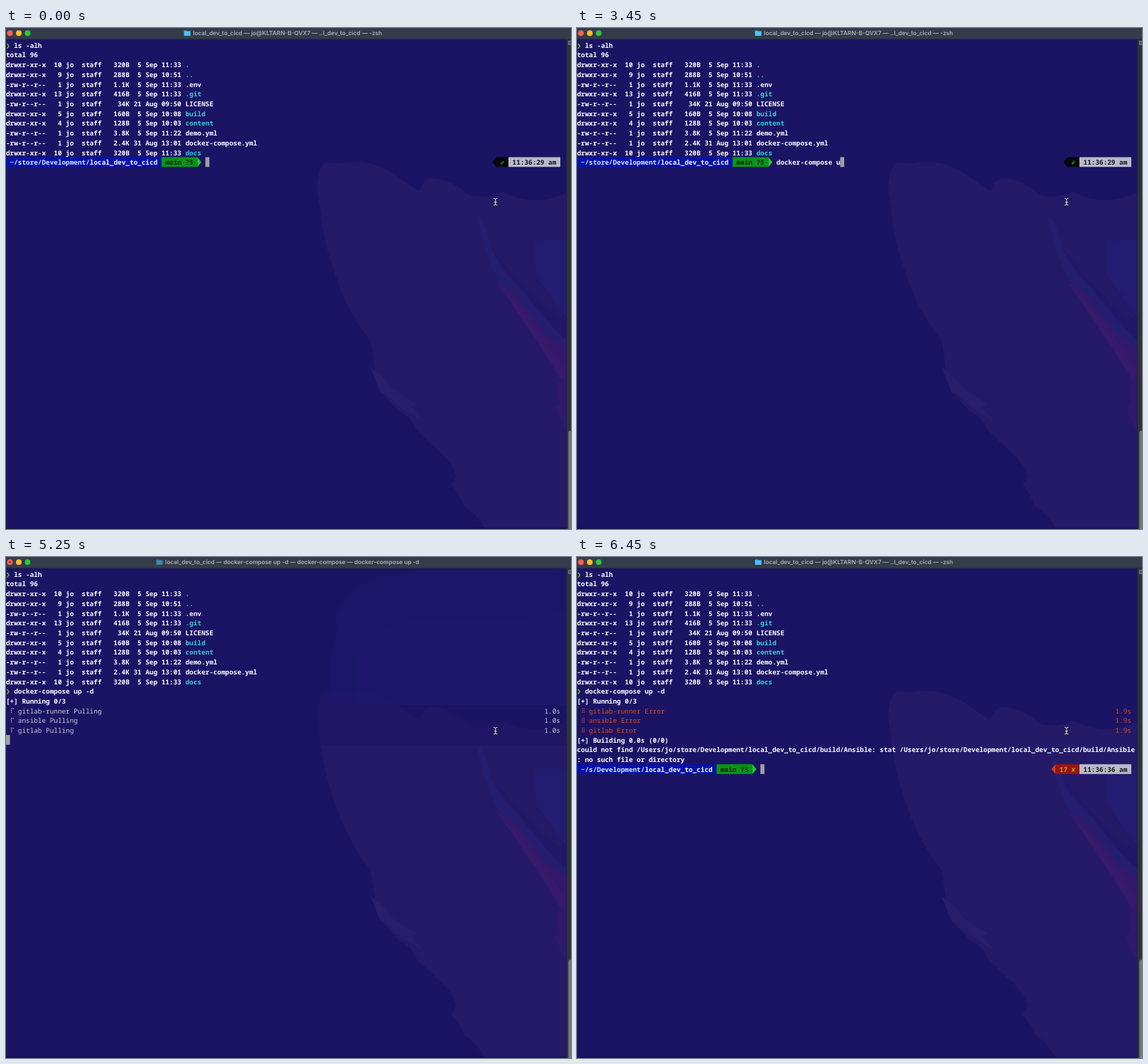
Animation, 795 px wide and 704 px high, one loop 8000 ms. Source, as an HTML page with a canvas:

```html
<!DOCTYPE html>
<html lang="en">
<head>
<meta charset="utf-8">
<title>Terminal session</title>
<style>
  html, body { margin: 0; width: 100%; height: 100%; overflow: hidden; background: #1b1464; }
  canvas { display: block; }
</style>
</head>
<body>
<canvas id="stage" width="795" height="704"></canvas>
<script>
const ctx = document.getElementById('stage').getContext('2d');
const LOOP = 8000, STEP = 150;
const CELL = 5.611, LINE = 13.71, TOP = 17;
const MONO = '9.35px "Noto Sans Mono", "DejaVu Sans Mono", monospace';
const WHITE = '#fbfbff', CYAN = '#35cdd6', GREY = '#cbc9cf', RED = '#dc4a24', CURSOR = '#a09fa8';
const COMMAND = 'docker-compose up -d';
const SPINNER = '⠋⠙⠹⠸⠼⠴⠦⠧⠇⠏';
const SERVICES = ['gitlab-runner', 'ansible', 'gitlab'];
const FILES = [
  ['drwxr-xr-x', 10, '320B', ' 5 Sep 11:33', '.'],
  ['drwxr-xr-x', 9, '288B', ' 5 Sep 10:51', '..'],
  ['-rw-r--r--', 1, '1.1K', ' 5 Sep 11:33', '.env'],
  ['drwxr-xr-x', 13, '416B', ' 5 Sep 11:33', '.git'],
  ['-rw-r--r--', 1, '34K', '21 Aug 09:50', 'LICENSE'],
  ['drwxr-xr-x', 5, '160B', ' 5 Sep 10:08', 'build'],
  ['drwxr-xr-x', 4, '128B', ' 5 Sep 10:03', 'content'],
  ['-rw-r--r--', 1, '3.8K', ' 5 Sep 11:22', 'demo.yml'],
  ['-rw-r--r--', 1, '2.4K', '31 Aug 13:01', 'docker-compose.yml'],
  ['drwxr-xr-x', 10, '320B', ' 5 Sep 11:33', 'docs']
];
const rowTop = row => TOP + row * LINE;

function rect(x, y, w, h, color) {
  ctx.fillStyle = color;
  ctx.fillRect(x, y, w, h);
}

function shape(points, color) {
  ctx.fillStyle = color;
  ctx.fill(new Path2D('M' + points + 'Z'));
}

function disc(x, y, r, color) {
  ctx.fillStyle = color;
  ctx.beginPath();
  ctx.arc(x, y, r, 0, 7);
  ctx.fill();
}

function text(col, row, str, color = WHITE, weight = 600) {
  ctx.font = weight + ' ' + MONO;
  ctx.fillStyle = color;
  ctx.fillText(str, col * CELL, rowTop(row) + 10.7);
}

function cells(from, to, row, color) {
  rect(from * CELL, rowTop(row), (to - from) * CELL, LINE, color);
}

// Powerline arrow one cell wide; dir 1 points right, -1 left
function arrow(col, row, dir, color) {
  const x = col * CELL, y = rowTop(row);
  shape(`${x} ${y}L${x + dir * CELL} ${y + LINE / 2}L${x} ${y + LINE}`, color);
}

function braille(row, char, color) {
  const bits = char.codePointAt(0) & 63;
  for (let i = 0; i < 6; i++) {
    if (bits >> i & 1) rect(i < 3 ? 7 : 9.4, rowTop(row) + 3.6 + i % 3 * 2.5, 1.3, 1.3, color);
  }
}

function wallpaper() {
  rect(0, 0, 795, 704, '#1b1464');
  shape('438 225Q439 196 450 189L472 190Q505 184 530 197C552 206 564 220 582 229Q587 212 600 211' +
    'Q625 212 652 235Q676 240 699 230Q738 253 788 232V704H674Q662 682 645 672Q634 648 627 643' +
    'L634 630Q627 608 604 590L578 565Q570 546 552 538L530 514L527 492L512 478L519 480' +
    'Q516 455 513 440Q490 410 478 384Q452 325 444 272Q441 245 438 225', '#251a68');
  shape('663 266Q672 268 677 290L689 323Q700 345 722 365L760 410Q775 430 788 437V465L752 428' +
    'Q721 386 693 355Q676 324 670 295', '#251e70');
  shape('679 303L692 327Q711 350 728 368Q753 405 788 437V330L745 303V350L788 410' +
    'Q755 397 741 374Q715 351 700 330', '#221869');
  shape('743 299L788 298V405Q773 392 765 374L745 349', '#241c70');
  shape('690 358Q710 365 726 386L757 426Q770 440 788 448V506Q773 474 752 446L733 421Q711 386 690 358', '#32196c');
  shape('700 369L730 401L788 477V505L745 437', '#371a6c');
  shape('776 500L788 490V566Q779 553 772 532L779 530', '#2e196a');
  shape('514 479L526 486L545 508L578 529L570 532L586 552L556 534L534 514L527 512', '#281e6d');
}

// Tint left over the wallpaper while the command is running
function tint(bottom) {
  ctx.save();
  ctx.beginPath();
  ctx.rect(0, 16, 788, bottom - 16);
  ctx.clip();
  shape('430 180H788V304H430', 'rgba(28,20,103,.6)');
  shape('457 208V140Q471 105 463 82Q480 47 513 33Q570 18 620 20L788 17V208', 'rgba(31,24,108,.5)');
  shape('494 208V145Q510 105 552 94Q620 82 690 89L788 78V208', 'rgba(30,24,109,.4)');
  ctx.restore();
}

function frame(running) {
  rect(0, 0, 795, 16, '#343c4b');
  rect(0, 15.4, 795, 1, '#202437');
  disc(5.5, 7.3, 4, '#ff5f57');
  disc(18, 7.3, 4, '#febc2e');
  disc(30.5, 7.3, 4, '#28c840');
  if (running) disc(5.5, 7.3, 1.2, '#8c1a10');

  const x = running ? 224 : 263;
  rect(x - 12.5, 3.5, 4, 2, running ? '#33789c' : '#39aee5');
  rect(x - 12.5, 4.5, 9, 6.5, running ? '#3c88ad' : '#4cc2f4');
  ctx.font = '600 8.25px Inter, "Open Sans", sans-serif';
  ctx.fillStyle = '#a9aeb8';
  ctx.fillText('local_dev_to_cicd — ' + (running
    ? `${COMMAND} — docker-compose — ${COMMAND}`
    : 'jo@KLTARN-B-QVX7 — ..l_dev_to_cicd — -zsh'), x, 10.2);

  rect(788, 16, 7, 688, '#30323b');
  rect(788, 16, 1, 688, '#20213d');
  rect(791, 18, 4, 6, '#777980');
  rect(792, 19.5, 3, 1, '#30323b');
  rect(792, 21.5, 3, 1, '#30323b');
  ctx.fillStyle = '#77787c';
  ctx.beginPath();
  ctx.roundRect(791.3, 566, 6, 140, 2);
  ctx.fill();
  rect(0, 702.5, 788, 1.5, '#151047');
}

function listing() {
  text(0, 0, '❯', '#86e51b');
  text(2, 0, 'ls -alh');
  text(0, 1, 'total 96');
  FILES.forEach(([mode, links, size, date, name], i) => {
    text(0, i + 2, `${mode}  ${String(links).padStart(2)} jo  staff  ${size.padStart(5)} ${date}`);
    text(45, i + 2, name, mode[0] === 'd' ? CYAN : WHITE);
  });
}

function prompt(row, dir, typed, clock, failed) {
  const end = dir.length + 19, input = end + 11;
  cells(0, end, row, '#0611a8');
  text(1, row, dir, '#d5e6f5');
  text(1 + dir.length, row, 'local_dev_to_cicd');
  cells(end, end + 9, row, '#0a9418');
  text(end + 1, row, 'main ?5', '#06200c');
  arrow(end + 9, row, 1, '#2dc334');
  text(input, row, typed);
  cells(input + typed.length, input + typed.length + 1, row, CURSOR);

  const left = failed ? 120 : 123;
  arrow(left, row, -1, failed ? '#d4411f' : '#05060b');
  cells(left, 126, row, failed ? '#981618' : '#05060b');
  if (failed) text(121, row, '17', '#b9a21b');
  text(124, row, failed ? '✘' : '✔', failed ? '#b9a21b' : '#13b51f');
  cells(126, 139, row, '#b9bac8');
  text(127, row, clock, '#15151f');
}

function services(t, failed) {
  const tenths = failed ? 19 : Math.floor((t - 4250) / 100);
  const color = failed ? RED : GREY;
  const dots = failed ? '⠿' : SPINNER[(tenths + 9) % 10];
  text(0, 13, '[+] Running 0/3');
  SERVICES.forEach((name, i) => {
    braille(14 + i, dots, color);
    text(3, 14 + i, name + (failed ? ' Error' : ' Pulling'), color, 500);
    text(135, 14 + i, (tenths / 10).toFixed(1) + 's', color, 500);
  });
}

function failure() {
  const path = '/Users/jo/store/Development/local_dev_to_cicd/build/Ansible';
  text(0, 17, '[+] Building 0.0s (0/0)');
  text(0, 18, `could not find ${path}: stat ${path}`);
  text(0, 19, ': no such file or directory');
}

function typedCount(t) {
  if (t < 1500) return 0;
  if (t < 3150) return Math.min(12, Math.floor(2 + (t - 1500) / 100));
  return Math.min(20, 14 + (t - 3150) / STEP);
}

function pointer() {
  for (const [color, width] of [['#17171f', 2.6], ['#e4e4ea', 1]]) {
    ctx.strokeStyle = color;
    ctx.lineWidth = width;
    ctx.stroke(new Path2D('M686 239.3Q688.8 239.3 688.8 241V247.2Q688.8 249 686 249' +
      'M691.6 239.3Q688.8 239.3 688.8 241M688.8 247.2Q688.8 249 691.6 249M687 244.7H690.6'));
  }
}

function draw(t) {
  const entered = t >= 4200, pulling = t >= 4350, failed = t >= 6300, done = t >= 6450;
  const running = entered && !done;
  const cursorRow = failed ? 20 : pulling ? 17 : 13;
  wallpaper();
  if (running) tint(rowTop(cursorRow + 1));
  frame(running);
  listing();
  if (!entered) {
    prompt(12, '~/store/Development/', COMMAND.slice(0, typedCount(t)), '11:36:29 am', false);
  } else {
    text(0, 12, '❯', '#86e51b');
    text(2, 12, COMMAND);
    if (pulling) services(t, failed);
    if (failed) failure();
    if (done) prompt(20, '~/s/Development/', '', '11:36:36 am', true);
    else cells(0, 1, cursorRow, CURSOR);
  }
  pointer();
}

ctx.textRendering = 'geometricPrecision';
const start = performance.now();
function tick() {
  const t = (performance.now() - start) % LOOP;
  draw(Math.floor(t / STEP) * STEP);
  requestAnimationFrame(tick);
}
tick();
</script>
</body>
</html>
```
